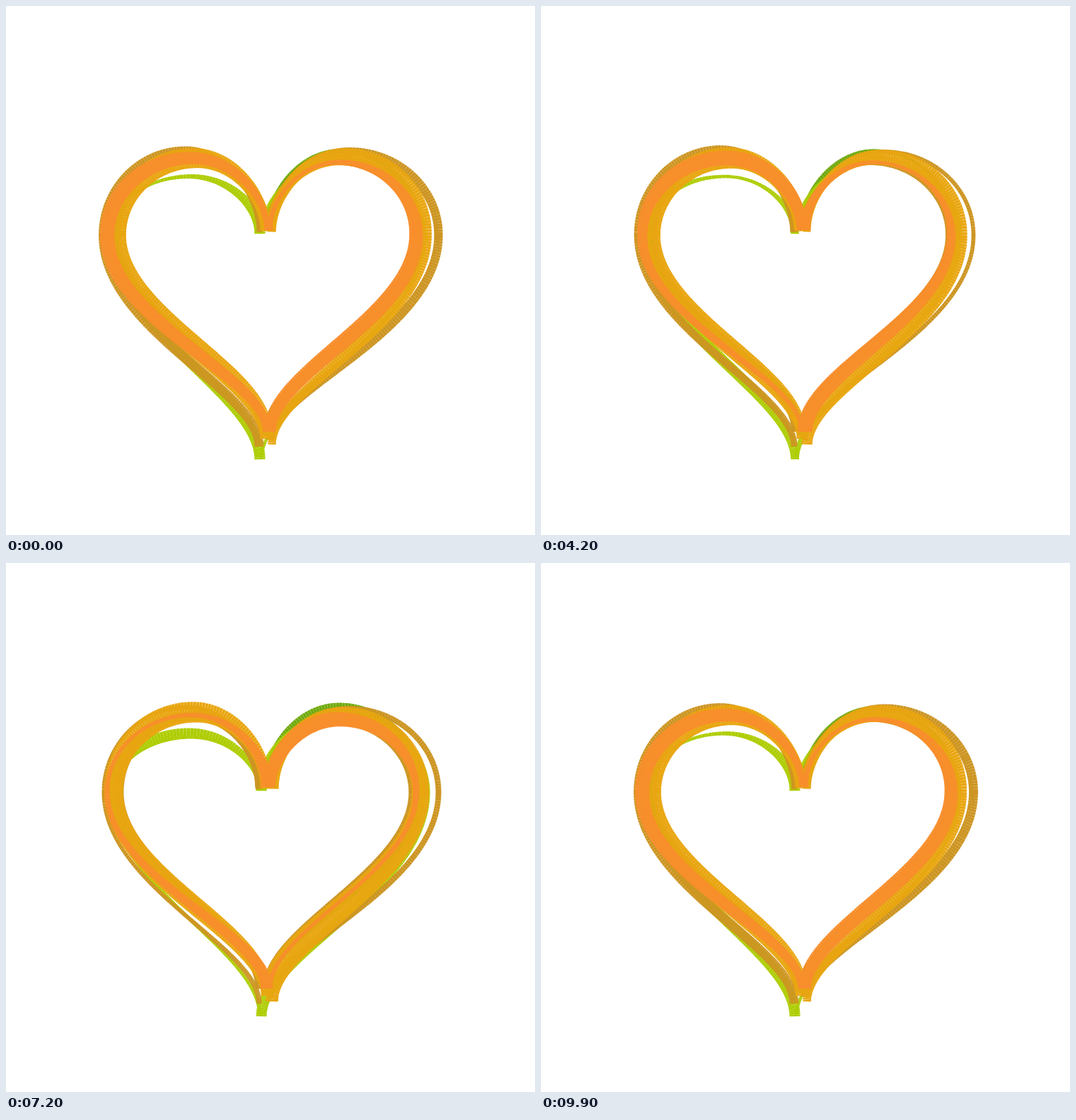
An HTML page with a canvas for the animation above (10000 ms loop, 748x748 px).

```html
<!DOCTYPE html>
<html lang="en">
<head>
<meta charset="utf-8">
<title>Brushed heart</title>
<style>
  html, body { margin: 0; width: 100%; height: 100%; overflow: hidden; background: #fff; }
  canvas { display: block; width: 748px; height: 748px; }
</style>
</head>
<body>
<canvas id="stage" width="748" height="748"></canvas>
<script>
const ctx = document.getElementById('stage').getContext('2d');
const LOOP = 10000, STEP = 100;
const CENTER = 367, SIDE_Y = 324, ROUND = 0.552, TICK = 4;

// Colour, mean width and how far the width swings.
const GREEN = { color: '#70aa0e', mean: 10, swing: 5 };
const LIME = { color: '#afcd04', mean: 10, swing: 5.5 };
const BROWN = { color: '#cd9522', mean: 9.5, swing: 4.5 };
const GOLD = { color: '#e9a611', mean: 15, swing: 4.5 };
const ORANGE = { color: '#f88e2c', mean: 13, swing: 8 };

const mix = (a, b, k) => a + (b - a) * k;

let seed = 7;
function random() {
  seed = seed * 16807 % 2147483647;
  return seed / 2147483647;
}

function bezier([a, b, c, d], k) {
  const m = 1 - k;
  const axis = j => m * m * m * a[j] + 3 * m * m * k * b[j] + 3 * m * k * k * c[j] + k * k * k * d[j];
  return [axis(0), axis(1)];
}

// Half a heart from the notch over the top and the side down to the tip.
function halfHeart(side, top, tipX, tipY) {
  const notch = 317 + (tipY - 602) * 0.13;
  const topX = mix(side, tipX, 0.53);
  const drop = tipY - SIDE_Y;
  const belly = 0.53 + 0.0015 * (Math.abs(side - CENTER) - 205);
  const pull = (belly - 0.125) / 0.75;
  const curves = [
    [[tipX, notch], [tipX, mix(notch, top, 0.48)], [mix(topX, tipX, ROUND), top], [topX, top]],
    [[topX, top], [mix(topX, side, ROUND), top], [side, mix(SIDE_Y, top, ROUND)], [side, SIDE_Y]],
    [[side, SIDE_Y], [side, SIDE_Y + drop * (pull - 0.14)], [tipX, SIDE_Y + drop * (pull + 0.14)], [tipX, tipY]]
  ];
  const points = [[tipX, notch, 0]];
  curves.forEach((curve, c) => {
    const [a, , , b] = curve;
    const count = Math.round(1.1 * Math.hypot(b[0] - a[0], b[1] - a[1]) / TICK);
    for (let i = 1; i <= count; i++) points.push([...bezier(curve, i / count), c + i / count]);
  });
  return points;
}

// The swelling peaks at the notch at `peak` of the loop and drifts along the stroke.
function brush(paint, shape, { peak = random(), drift = 0.3 * random() - 0.15, cycles = 2 } = {}) {
  const width = (u, t) => paint.mean + paint.swing * Math.cos(2 * Math.PI * cycles * (t - peak - drift * u));
  return { color: paint.color, points: halfHeart(...shape), width };
}

const brushes = [
  brush(GREEN, [155, 217, 364, 600]),
  brush(GREEN, [586, 205, 369, 605]),
  brush(LIME, [149, 241, 359, 641], { peak: 0.02, drift: 0.167 }),
  brush(LIME, [592, 221, 361, 641]),
  brush(BROWN, [138, 204, 358, 623]),
  brush(BROWN, [160, 216, 359, 602]),
  brush(BROWN, [611.5, 206, 374, 613], { peak: 0.285, drift: 0, cycles: 3 }),
  brush(BROWN, [576, 222, 369, 602]),
  brush(GOLD, [148, 206, 368, 612]),
  brush(GOLD, [160, 220, 367, 602]),
  brush(GOLD, [593, 210, 376, 620]),
  brush(GOLD, [583, 219, 373, 602]),
  brush(ORANGE, [143, 215, 369, 602], { peak: 0.31, drift: 0.11 }),
  brush(ORANGE, [580, 221, 373, 602], { peak: 0.33, drift: -0.14 })
];

function paint(t) {
  ctx.fillStyle = '#fff';
  ctx.fillRect(0, 0, 748, 748);
  for (const { color, points, width } of brushes) {
    ctx.strokeStyle = color;
    for (let i = 1; i < points.length; i++) {
      const [ax, ay, au] = points[i - 1], [bx, by, bu] = points[i];
      ctx.lineWidth = width((au + bu) / 2, t);
      ctx.beginPath();
      ctx.moveTo(ax, ay);
      ctx.lineTo(bx, by);
      ctx.stroke();
    }
  }
}

let shown = -1;
function frame() {
  const time = Math.floor(performance.now() % LOOP / STEP) * STEP;
  if (time !== shown) {
    shown = time;
    paint(time / LOOP);
  }
  requestAnimationFrame(frame);
}
frame();
</script>
</body>
</html>
```
